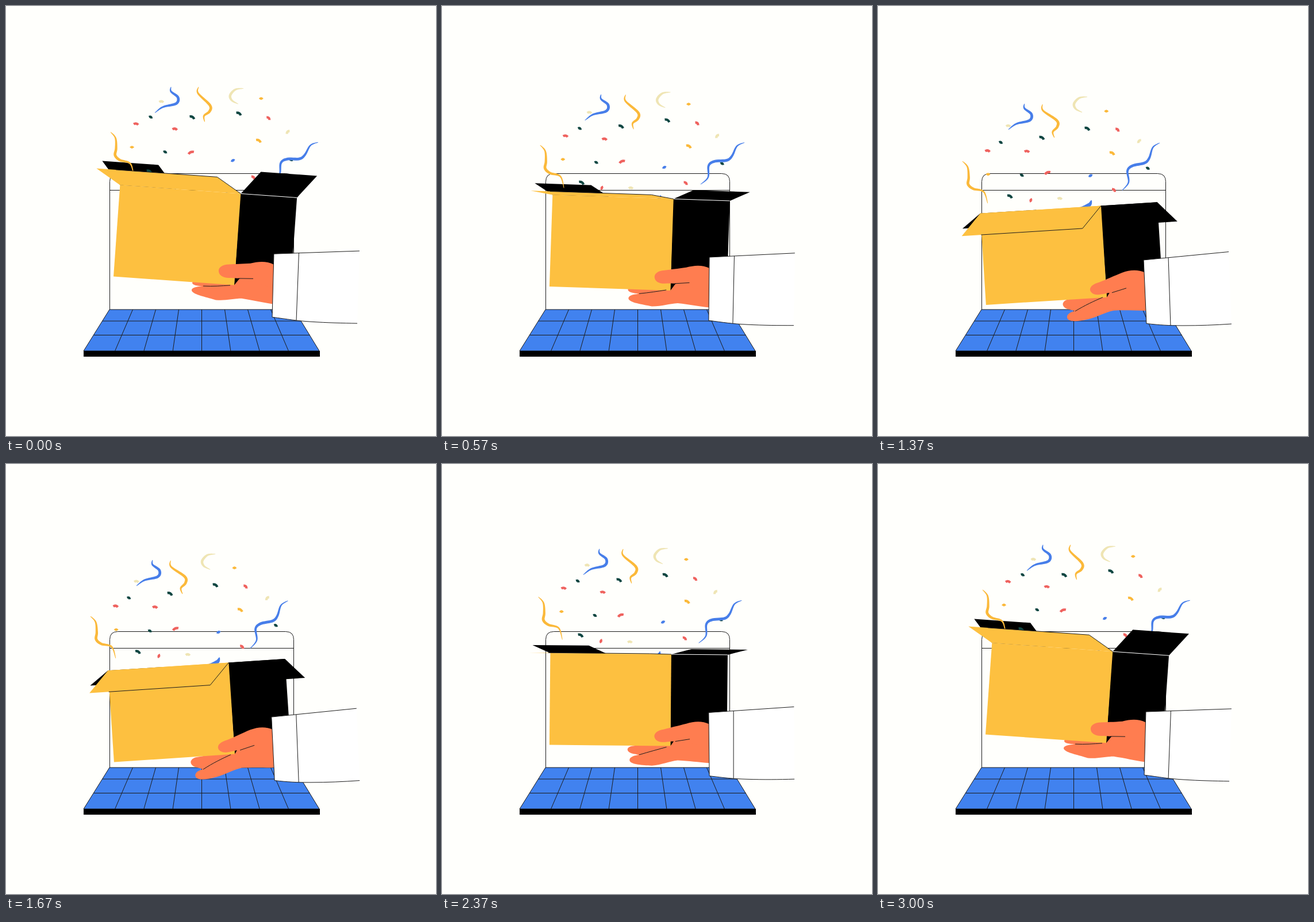
An HTML page that plays this animation: 748 px wide and 748 px high, repeating every 3030 ms.

```html
<!DOCTYPE html>
<html lang="en">
<head>
<meta charset="utf-8">
<title>Surprise box</title>
<style>
  html, body { margin: 0; width: 100%; height: 100%; overflow: hidden; background: #fffffc; }
  svg { display: block; width: 100vw; height: 100vh; }
  .line { fill: none; stroke: #1c1c1c; stroke-width: 1; }
  .gold { fill: #fdc040; }
  .skin { fill: #ff7d50; }
</style>
</head>
<body>
<svg viewBox="0 0 748 748">
  <g class="line">
    <path d="M180.5 528V305.5Q180.5 291.5 194.5 291.5H486.5Q500.5 291.5 500.5 305.5V528M180.5 320.5H500.5"/>
    <path d="M180 528H501L545 600H135Z" fill="#4182ef"/>
    <path id="keys"/>
  </g>
  <path d="M135 600H546V610H135Z"/>
  <path id="leftFlap"/>
  <g id="confetti"></g>
  <path id="fingers" class="skin"/>
  <path id="side"/>
  <path id="rightFlap"/>
  <path id="hinge" fill="none" stroke="#fff"/>
  <path id="front" class="gold"/>
  <path id="frontFlap" class="gold"/>
  <path id="flapEdge" class="line"/>
  <path id="thumb" class="skin"/>
  <path id="creases" class="line"/>
  <path id="sleeve" class="line" style="fill:#fff"/>
  <path id="cuff" class="line"/>
</svg>
<script>
const LOOP = 3030;
const DARK = '#0f4641', RED = '#ef625e', GOLD = '#fbb93a', CREAM = '#efe5b4', BLUE = '#477ee9';

const $ = id => document.getElementById(id);
const draw = (id, d) => $(id).setAttribute('d', d);
const poly = points => 'M' + points.map(p => p.map(n => n.toFixed(2))).join('L');
const add = (a, b) => [a[0] + b[0], a[1] + b[1]];
const lerp = (a, b, u) => a.map((v, i) => v + (b[i] - v) * u);

// Everything sways once per loop: 0 is raised, 1 is lowered.
const swing = t => (1 - Math.cos(2 * Math.PI * t / LOOP)) / 2;
const LEAD = 150; // vertical motion runs slightly ahead of the sideways motion

// Blend two path strings that share their commands.
function blend(from, to, k, dy) {
  const number = /-?\d+(\.\d+)?/g, target = to.match(number);
  let i = 0;
  return from.replace(number, n => {
    const value = +n + (target[i] - n) * k + (i % 2 ? dy : 0);
    i++;
    return value.toFixed(2);
  });
}

// Tapered ribbon around a smooth line through the given points.
function ribbon(points, width) {
  const end = points.length - 1;
  const at = s => {
    const i = Math.min(Math.floor(s), end - 1), u = s - i;
    const p = n => points[Math.max(0, Math.min(end, n))];
    return [0, 1].map(c => {
      const a = p(i - 1)[c], b = p(i)[c], d = p(i + 1)[c], e = p(i + 2)[c];
      return b + u * ((d - a) + u * ((2 * a - 5 * b + 4 * d - e) + u * (3 * b - a - 3 * d + e))) / 2;
    });
  };
  const left = [], right = [], steps = 48;
  for (let n = 0; n <= steps; n++) {
    const s = end * n / steps, a = at(Math.max(0, s - .05)), b = at(Math.min(end, s + .05)), c = at(s);
    const half = width / 2 * (.15 + .85 * Math.sin(Math.PI * n / steps));
    const len = Math.hypot(b[0] - a[0], b[1] - a[1]) || 1;
    const off = [-(b[1] - a[1]) / len * half, (b[0] - a[0]) / len * half];
    left.push(add(c, off));
    right.unshift([c[0] - off[0], c[1] - off[1]]);
  }
  return poly([...left, ...right]) + 'Z';
}

const pieces = [];
function piece(attrs, raised, drift, turn) {
  const node = document.createElementNS('http://www.w3.org/2000/svg', 'path');
  for (const name in attrs) node.setAttribute(name, attrs[name]);
  $('confetti').append(node);
  pieces.push({ node, raised, drift, turn });
}

// Chips hang around a middle point; those on the left fall further, the higher ones sway wider.
function chips(color, size, tilt, ...middles) {
  const d = `M${-size / 2} 1Q0 -2.5 ${size / 2} 1`;
  for (const [x, y] of middles) {
    const drift = [.2 * y - 82, 73 - .12 * x];
    piece({ d, fill: 'none', stroke: color, 'stroke-width': 4.2 },
      [x - drift[0] / 2, y - drift[1] / 2], drift, () => tilt);
  }
}
const streamer = (color, width, points, raised, drift, twist = 0) =>
  piece({ d: ribbon(points, width), fill: color }, raised, drift, t => twist * (1 - swing(t)));

chips(DARK, 9, 30, [304, 211], [384, 200], [239, 309]);
chips(DARK, 5, 30, [232, 215], [263, 274], [482, 275]);
chips(RED, 8, 8, [208, 228], [276, 233]);
chips(RED, 7, 43, [436, 205], [420, 309]);
chips(RED, 10, -22, [308, 272]);
chips(RED, 5, -70, [275, 318]);
chips(GOLD, 4.5, 0, [205, 269], [420, 172]);
chips(GOLD, 9, 30, [423, 245]);
chips(CREAM, 7, -48, [472, 227]);
chips(CREAM, 7, 5, [248, 187], [325, 318]);
chips(BLUE, 5, -25, [382, 282]);

streamer(BLUE, 4.8, [[0, 0], [0, 8], [12, 18], [9, 29], [-14, 35], [-28, 45]], [287, 140], [-33, 30]);
streamer(GOLD, 4.8, [[0, 0], [1, 11], [25, 28], [26, 39], [18, 48], [21, 58]], [335, 140], [-50, 31], 10);
streamer(CREAM, 4.5, [[0, 0], [-14, 2], [-23, 12], [-20, 21], [-9, 27]], [413, 143], [-50, 15]);
streamer(GOLD, 4.8, [[0, 0], [9, 10], [11, 28], [10, 40], [19, 48], [37, 53], [44, 73]], [182, 218], [-36, 52], 3);
streamer(BLUE, 4.8, [[0, 0], [-12, 8], [-18, 26], [-26, 35], [-47, 40], [-56, 49], [-54, 69], [-65, 83]], [543, 237], [-54, 1], 12);
streamer(BLUE, 7, [[0, 0], [-3, 7], [-10, 11], [-22, 14]], [385, 322], [-14, 16]);

const BOX = { width: 210.5, height: 159.5, depth: 98 };

// Each arm part: level, then tipped down.
const ARM = {
  fingers: [
    'M400 482L330 489C322 490 322 495 330 497C334 498 338 498 342 498.5C328 499 322 502 323 506C326 513 345 516 365 522.5C383 524 395 520 410 520C430 523 445 527 466 530L466 475Z',
    'M400 500L330 511C320 514 319 522 326 526C331 529 339 529 342 531.5C331 534 327 540 330 545C335 551 350 549 365 545.5C383 541 395 533 410 530C430 529 445 530 466 530L466 470Z'],
  thumb: [
    'M466 461C452 454 438 456 425 459C410 460 398 460 388 460.5C376 460.5 369 466 370 473C371 480 378 484 388 484C394 484 399 484.5 404 485L466 502Z',
    'M465 464C452 458 438 459 425 464C410 470 398 476 385 481C374 484 368 489 369 495C371 501 378 504 388 502C394 501 399 499.5 404 499L466 500Z'],
  creases: [
    'M343 498C360 499 375 498 390 497M404 485L430 485.5',
    'M343 531.5C360 521 375 514 391 507M407 499L432 491'],
  sleeve: [
    'M615 437.5L466 442.5L463 552.5C490 556 505 559 530 560.5C560 562.5 585 563 611 563.5',
    'M610 427.5L462 442L467 552.5C490 555 505 556 530 556C560 556 585 555 615 553'],
  cuff: ['M509.5 441L505 558', 'M505 438L509 555.5']
};

// Key columns fan out from the screen towards the front edge.
let columns = 'M167.5 548H513.5M152.5 572.5H528.5';
for (let i = -3; i <= 3; i++) columns += `M${340.5 + 40 * i} 528L${340.5 + 50.3 * i} 600`;
draw('keys', columns);

function drawBox(t) {
  const { width, height, depth } = BOX, fold = swing(t);
  const corner = [397 + fold, 485 + 21.7 * swing(t + LEAD)];
  const angle = (4.1 - 8 * swing(t - 45)) * Math.PI / 180, c = Math.cos(angle), s = Math.sin(angle);
  const at = (x, y) => add(corner, [x * c - y * s, x * s + y * c]);
  const leftTop = at(-width, -height), rightTop = at(0, -height), farTop = at(depth, -height);
  const frontFold = [-41 + 9 * fold, -29 + 70 * fold];
  const rightFold = [35, -38 + 73 * fold];
  const leftFold = [-31, -42 + 70 * fold];
  const flap = (p, q, offset) => poly([p, q, add(q, offset), add(p, offset)]) + 'Z';
  const outerLeft = add(leftTop, frontFold), outerRight = add(rightTop, frontFold);

  draw('leftFlap', flap(leftTop, at(depth - width, -height), leftFold));
  draw('side', poly([corner, at(-1, -height), farTop, at(depth, -40), at(8, -11.5)]) + 'Z');
  draw('rightFlap', flap(rightTop, farTop, rightFold));
  draw('hinge', rightFold[1] < 0 ? poly([rightTop, farTop]) : '');
  draw('front', poly([corner, at(-width, 0), leftTop, rightTop]) + 'Z');
  draw('frontFlap', flap(leftTop, rightTop, frontFold));
  draw('flapEdge', poly([lerp(outerLeft, outerRight, .16), outerRight, rightTop]));
}

function drawArm(t) {
  const tip = 1.05 * swing(t - 100), lift = 12 * swing(t + 236) - 12;
  for (const part in ARM) draw(part, blend(...ARM[part], tip, lift));
}

function drawConfetti(t) {
  const across = swing(t), down = swing(t + LEAD);
  for (const { node, raised, drift, turn } of pieces) {
    const x = raised[0] + drift[0] * across, y = raised[1] + drift[1] * down;
    node.setAttribute('transform', `translate(${x.toFixed(2)} ${y.toFixed(2)}) rotate(${turn(t).toFixed(2)})`);
  }
}

function frame() {
  const t = performance.now() % LOOP;
  drawBox(t);
  drawArm(t);
  drawConfetti(t);
  requestAnimationFrame(frame);
}
frame();
</script>
</body>
</html>
```
